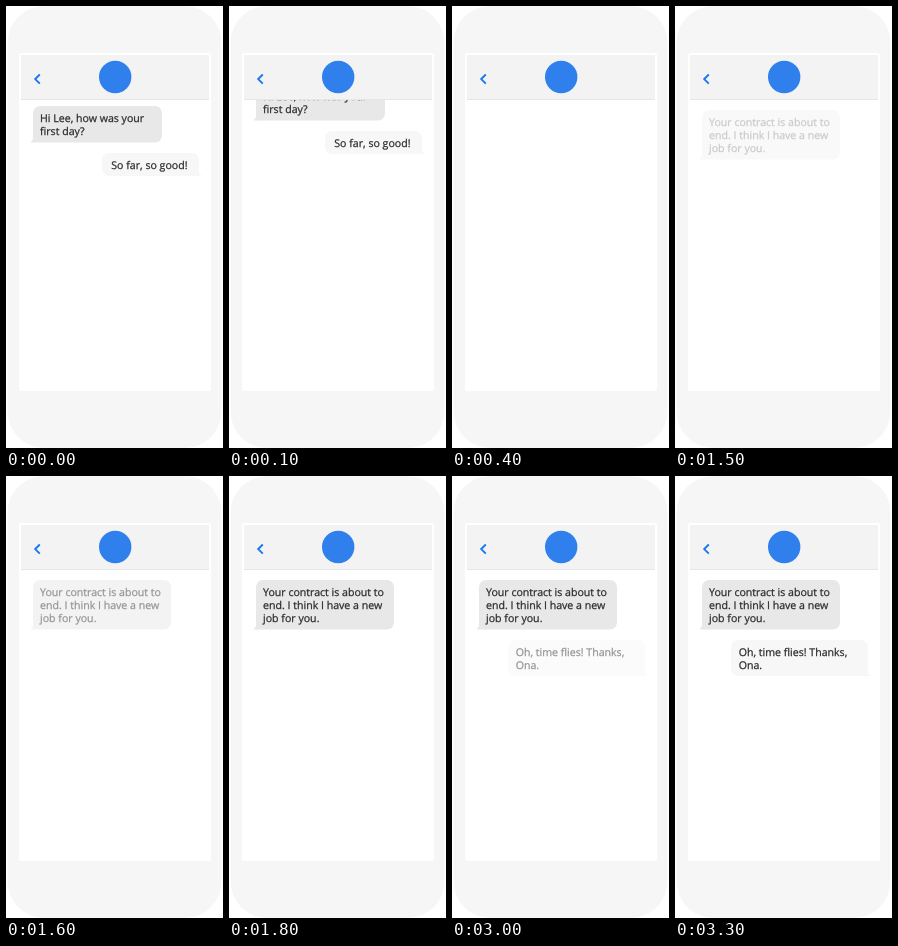
Recreate the animation shown at these times as an HTML page. Size 217 by 442 pixels, loop 8000 ms.

```html
<!DOCTYPE html>
<html lang="en">
<head>
<meta charset="utf-8">
<title>Chat</title>
<style>
  html, body { margin: 0; width: 100%; height: 100%; overflow: hidden; background: #fff; }
  svg { display: block; width: 217px; height: 442px; }
  text {
    font: 10.6px "Open Sans", "Noto Sans", sans-serif;
    fill: #2b2b2b;
    stroke: #2b2b2b;
    stroke-width: .25px;
    text-rendering: geometricPrecision;
  }
  .bot { fill: #e8e8e8; }
  .user { fill: #f7f7f7; }

  .old, .contract, .reply { animation: 8s step-end infinite; }
  .old { animation-name: scroll; }
  .contract { animation-name: contract; }
  .reply { animation-name: reply; }

  /* every step lasts 100 ms = 1.25% */
  @keyframes scroll {
    0% { transform: translateY(0); }
    1.25% { transform: translateY(-22px); }
    2.5% { transform: translateY(-44px); }
    3.75% { transform: translateY(-66px); }
    5%, 100% { transform: translateY(-88px); }
  }
  @keyframes contract {
    0% { opacity: 0; }
    18.75% { opacity: .25; }
    20% { opacity: .5; }
    21.25% { opacity: .75; }
    22.5%, 100% { opacity: 1; }
  }
  @keyframes reply {
    0% { opacity: 0; }
    35% { opacity: .167; }
    36.25% { opacity: .333; }
    37.5% { opacity: .5; }
    38.75% { opacity: .667; }
    40% { opacity: .833; }
    41.25%, 100% { opacity: 1; }
  }
</style>
</head>
<body>
<svg viewBox="0 0 217 442">
  <defs>
    <clipPath id="chat"><rect x="15" y="94" width="188" height="289"/></clipPath>
  </defs>

  <rect x="1.5" y="0" width="214" height="442" rx="37" fill="#f6f6f6"/>
  <rect x="13" y="47" width="192" height="338" rx="2" fill="#fff"/>
  <rect x="15" y="49" width="188" height="45" fill="#f3f3f3"/>
  <rect x="15" y="93" width="188" height="1" fill="#e6e6e6"/>
  <path d="M33.8 68.5L29.2 73.1L33.8 77.7" fill="none" stroke="#1877f2" stroke-width="1.9"/>
  <circle cx="109.2" cy="71" r="16.2" fill="#2f80ed"/>

  <g clip-path="url(#chat)">
    <g class="old">
      <g class="bot">
        <rect x="27" y="100" width="129" height="36.5" rx="7"/>
        <path d="M27 126V133L24.5 136.5H34Z"/>
      </g>
      <text x="34" y="115.7">Hi Lee, how was your</text>
      <text x="34" y="129">first day?</text>
      <g class="user">
        <rect x="96" y="147" width="97" height="23" rx="7"/>
        <path d="M193 160V167L195.5 170H186Z"/>
      </g>
      <text x="105.3" y="163">So far, so good!</text>
    </g>

    <g class="contract">
      <g class="bot">
        <rect x="27" y="104" width="138" height="49.5" rx="7"/>
        <path d="M27 143V150L24.5 153.5H34Z"/>
      </g>
      <text x="34" y="119.5">Your contract is about to</text>
      <text x="34" y="132.8">end. I think I have a new</text>
      <text x="34" y="146">job for you.</text>
    </g>

    <g class="reply">
      <g class="user">
        <rect x="56" y="164" width="137" height="36" rx="7"/>
        <path d="M193 190V197L195.5 200H186Z"/>
      </g>
      <text x="63.7" y="179.5">Oh, time flies! Thanks,</text>
      <text x="63.7" y="192.8">Ona.</text>
    </g>
  </g>
</svg>
</body>
</html>
```
